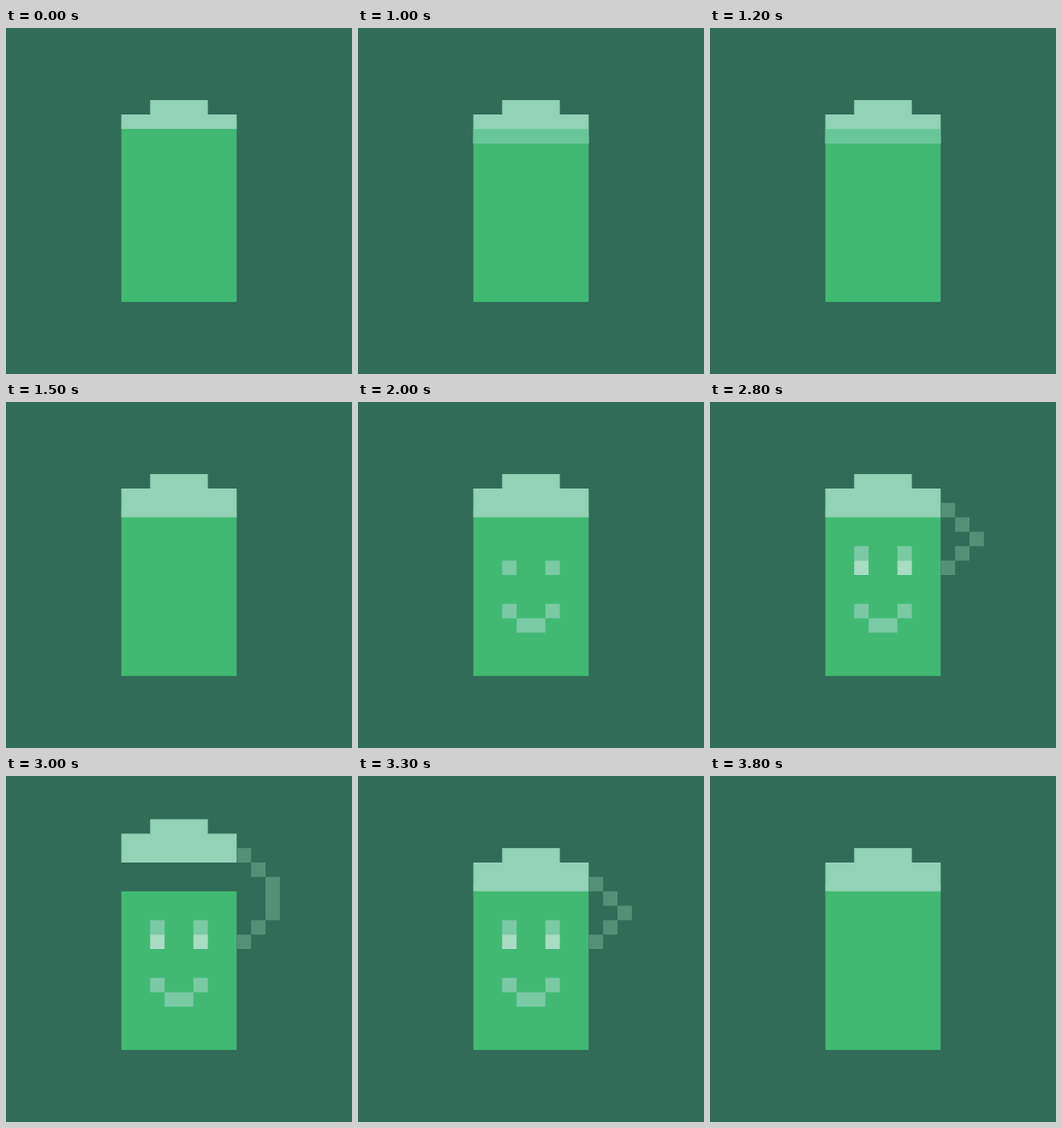
These frames come from a looping animation (380 px wide and 380 px high, 3.9 s). An HTML page with a canvas:

```html
<!DOCTYPE html>
<html lang="en">
<head>
<meta charset="utf-8">
<title>Battery</title>
<style>
  html, body { margin: 0; width: 100%; height: 100%; overflow: hidden; background: #306c58; }
  canvas { display: block; width: 100%; height: 100%; }
</style>
</head>
<body>
<canvas id="stage" width="380" height="380"></canvas>
<script>
const ctx = document.getElementById('stage').getContext('2d');
const CELL = 380 / 24;
const LOOP = 3900;
const STEP = 100;
const COLOR = {
  back: '#306c58', body: '#41b973', lid: '#92d2b7', band: '#69c797',
  dim: '#7acaa4', bright: '#a9dcc3', arm: '#568f78'
};

// All positions are in cells of a 24 x 24 grid.
function block(color, x, y, w = 1, h = 1) {
  ctx.fillStyle = color;
  ctx.fillRect(x * CELL, y * CELL, w * CELL, h * CELL);
}

// How far the lower lid row is lit: 0, 0.5 or 1.
function bandLevel(step) {
  if (step < 10) return 0;
  if (step >= 15) return 1;
  return [0.5, 1, 0.5, 0][(step - 10) % 4];
}

// 0 hidden, 1 half open, 2 awake.
function faceLevel(step) {
  return Math.max(0, Math.min(2, step - 19, 38 - step));
}

// The arm reaches out, then raises the lid, and returns the same way.
function reachLevel(step) {
  return Math.max(0, Math.min(5, step - 25, 36 - step - (step > 31 ? 0 : -1)));
}

function drawBattery(band, lift) {
  const bottom = band ? 8 : 7;
  const top = lift ? 8 : bottom - 0.5;
  block(COLOR.body, 8, top, 8, 19 - top);
  block(COLOR.lid, 10, 5 - lift, 4, 1.5);
  block(COLOR.lid, 8, 6 - lift, 8, bottom - 6);
  if (band === 0.5) block(COLOR.band, 8, 7, 8, 1);
}

function drawFace(level) {
  if (!level) return;
  for (const x of [10, 13]) {
    if (level === 2) block(COLOR.dim, x, 10);
    block(level === 2 ? COLOR.bright : COLOR.dim, x, 11);
    block(COLOR.dim, x, 14);
  }
  block(COLOR.dim, 11, 15, 2);
}

function drawArm(reach, lift) {
  if (!reach) return;
  if (reach === 1) {
    block(COLOR.arm, 16, 11, 2);
    return;
  }
  block(COLOR.arm, 16, 11);
  block(COLOR.arm, 17, 10);
  block(COLOR.arm, 18, 9 - lift, 1, 1 + lift);
  if (reach > 2) {
    block(COLOR.arm, 17, 8 - lift);
    block(COLOR.arm, 16, 7 - lift);
  }
}

function draw(time) {
  const step = Math.floor((time % LOOP) / STEP);
  const reach = reachLevel(step);
  const lift = Math.max(0, reach - 3);
  block(COLOR.back, 0, 0, 24, 24);
  drawBattery(bandLevel(step), lift);
  drawFace(faceLevel(step));
  drawArm(reach, lift);
}

const start = performance.now();
function tick() {
  draw(performance.now() - start);
  requestAnimationFrame(tick);
}
tick();
</script>
</body>
</html>
```
